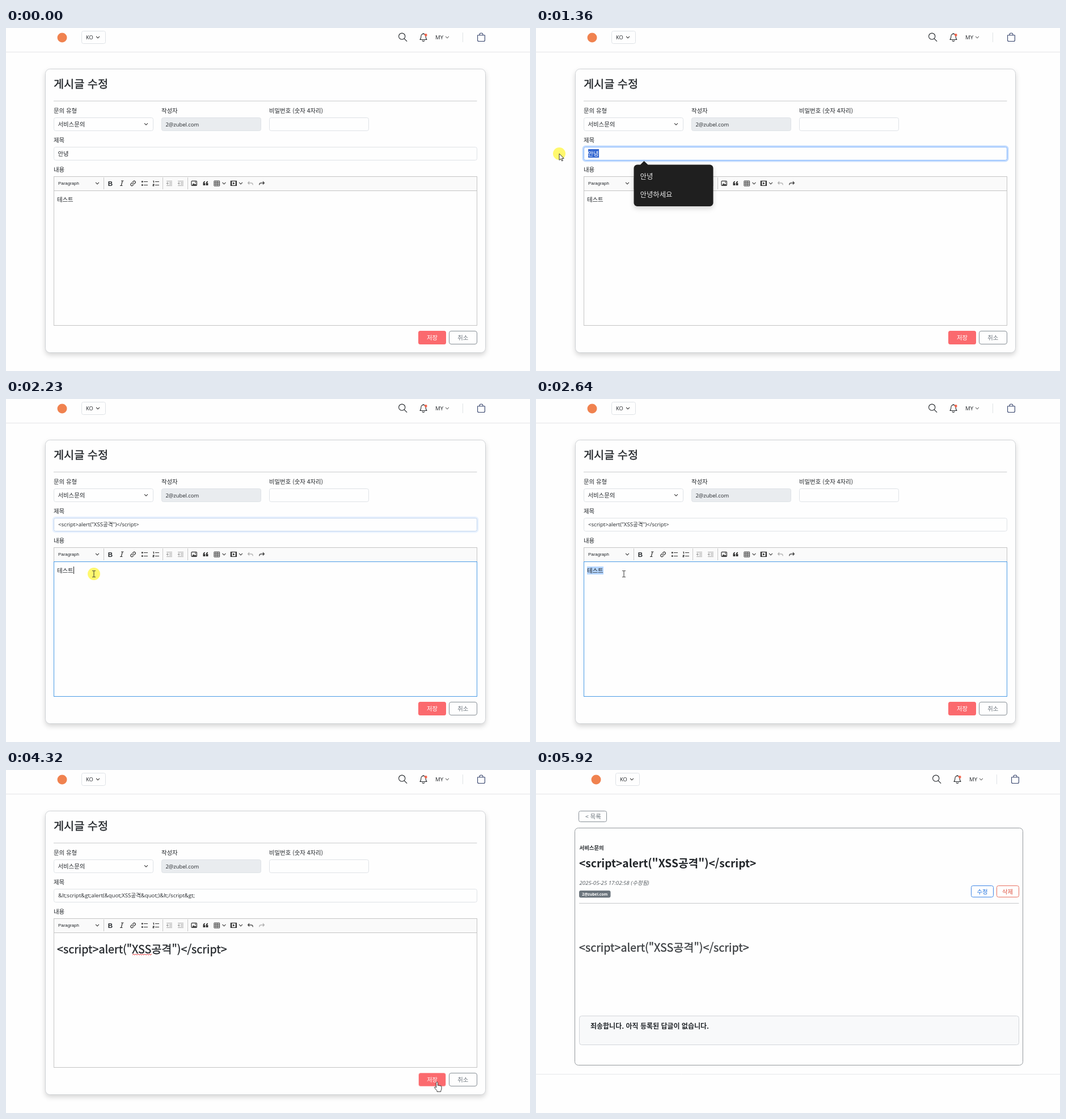
An HTML page for the animation above (6.45 s loop, 924 px wide and 606 px high).

```html
<!DOCTYPE html>
<html lang="ko">
<head>
<meta charset="utf-8">
<title>게시글 수정</title>
<style>
html, body { margin: 0; width: 100%; height: 100%; overflow: hidden; background: #fefefe; }
svg { display: block; width: 924px; height: 606px; }
text { font-family: "Noto Sans CJK KR", "Noto Sans CJK JP", "Noto Sans CJK", sans-serif; font-size: 10.4px; fill: #212529; white-space: pre; }
.ui { font-family: "Open Sans", "Noto Sans CJK KR", "Noto Sans CJK JP", sans-serif; font-size: 9.6px; }
.head { font-size: 19.7px; stroke: #212529; stroke-width: .35px; }
.soft { fill: #3a3d40; stroke: #3a3d40; }
.bold { font-weight: 700; }
.mid { text-anchor: middle; }
.line { fill: none; stroke: #212529; stroke-width: 1.1; stroke-linecap: round; stroke-linejoin: round; }
.box { fill: #fefefe; stroke: #dee2e6; }
.rule { stroke: #c6c8ca; }
.tool { fill: none; stroke: #333; stroke-width: 1.2; }
.dim { opacity: .4; }
.card { filter: drop-shadow(0 4px 4px rgba(0, 0, 0, .16)); }

.step, .ease { animation: 6.45s step-end infinite; }
.ease { animation-timing-function: linear; }

@keyframes edit { 71.3% { opacity: 0 } }
@keyframes view { 0% { opacity: 0 } 71.3% { opacity: 1 } }
@keyframes shift { 71.3% { transform: translateX(7px) } }
@keyframes late { 71.3% { opacity: 0 } 75.1% { opacity: 1 } }
@keyframes footer { 0% { opacity: 0 } 75.1% { opacity: 1 } }

@keyframes ring { 0%, 14.4% { opacity: 0 } 16.7%, 33.4% { opacity: 1 } 35.2%, 100% { opacity: 0 } }
@keyframes popup { 0%, 26.4% { opacity: 0 } 15.5% { opacity: 1 } }
@keyframes picked { 0%, 26.4% { opacity: 0 } 17.6% { opacity: 1 } }
@keyframes oldTitle { 26.4% { opacity: 0 } }
@keyframes newTitle { 0%, 65.7% { opacity: 0 } 26.4% { opacity: 1 } }
@keyframes escaped { 0% { opacity: 0 } 65.7% { opacity: 1 } }

@keyframes focus { 0%, 63% { opacity: 0 } 33.8% { opacity: 1 } }
@keyframes caretA { 0%, 36.5% { opacity: 0 } 33.8% { opacity: 1 } }
@keyframes marked { 0%, 44.1% { opacity: 0 } 36.5% { opacity: 1 } }
@keyframes before { 44.1% { opacity: 0 } }
@keyframes after { 0% { opacity: 0 } 44.1% { opacity: 1 } }
@keyframes caretB { 0%, 52.9%, 63% { opacity: 0 } 44.1%, 61% { opacity: 1 } }
@keyframes squiggle { 0% { opacity: 0 } 63% { opacity: 1 } }
@keyframes undo { 0% { opacity: .4 } 44.1% { opacity: 1 } }
@keyframes redo { 0% { opacity: 1 } 44.1% { opacity: .4 } }
@keyframes press { 63% { transform: scale(.97) } }

@keyframes move {
  0%, 3.1% { transform: translate(840px, 586px) }
  4.6% { transform: translate(759px, 552px) }
  12.5%, 13.4% { transform: translate(188px, 255px) }
  14.4% { transform: translate(175px, 222px) }
  19.5%, 33.2% { transform: translate(41px, 222px) }
  34.5%, 44.1% { transform: translate(155px, 309px) }
  51.7%, 52.8% { transform: translate(293px, 428px) }
  53.9%, 55% { transform: translate(310px, 460px) }
  61.5% { transform: translate(764px, 559px) }
  63%, 71.3% { transform: translate(760px, 552px) }
  74.2%, 76% { transform: translate(812px, 547px) }
  80% { transform: translate(823px, 510px) }
  85.7%, 87.7% { transform: translate(794px, 448px) }
  91.7%, 100% { transform: translate(868px, 604px) }
}
@keyframes arrow {
  0%, 4.2%, 13.6%, 33.9%, 60.5%, 91.7% { opacity: 0 }
  3.1%, 12%, 17.9%, 59.2%, 71.3% { opacity: 1 }
}
@keyframes beam {
  0%, 12%, 17.9%, 59.2% { opacity: 0 }
  5.3%, 13.6%, 33.9% { opacity: 1 }
}
@keyframes hand {
  0%, 5.3%, 71.3% { opacity: 0 }
  4.2%, 60.5% { opacity: 1 }
}
@keyframes click {
  0%, 23.2%, 35.9%, 64.9% { opacity: 0 }
  14.4%, 34.2%, 63% { opacity: 1 }
}
#save { transform-box: fill-box; transform-origin: center; animation-name: press; }
</style>
</head>
<body>
<svg viewBox="0 0 924 606">
  <defs>
    <path id="chev" d="M-2.6-1.3L0 1.3 2.6-1.3" fill="none" stroke="#333" stroke-width="1.1" stroke-linecap="round"/>
    <path id="turn" d="M-1.8-3.2L-4.4-.7-1.8 1.8M-4.2-.7H1.5Q4.2-.7 4.4 2.6" fill="none" stroke="#333" stroke-width="1.2"/>
    <g id="dent">
      <path d="M-5-4H5M0-1.3H5M0 1.3H5M-5 4H5" class="tool"/>
      <path d="M-2.2-2.2L-4.6 0-2.2 2.2M-4.6 0H-1" class="tool"/>
    </g>
  </defs>

  <!-- header -->
  <path d="M0 42.5H924" stroke="#e3e5e7"/>
  <g class="step" style="animation-name:shift">
    <circle cx="99" cy="17" r="8.5" fill="#f0824f"/>
    <rect class="box" x="133.5" y="5.5" width="42" height="22" rx="3"/>
    <text class="ui" x="141" y="20" style="font-size:9.3px">KO</text>
    <use href="#chev" x="162" y="16.5"/>
    <circle class="line" cx="698.2" cy="14.7" r="5.6"/>
    <path class="line" d="M702.3 18.8L706.8 23.3"/>
    <g class="step" style="animation-name:late">
      <path class="line" d="M730 20.5h12c-1.9-1.6-1.7-3.6-1.9-6a4.1 4.1 0 0 0-8.2 0c-.2 2.4 0 4.4-1.9 6zM736 10.2V9.2M734.3 22.3a1.8 1.8 0 0 0 3.4 0"/>
      <use href="#chev" x="778" y="16.5" opacity=".7"/>
    </g>
    <circle cx="740.3" cy="12.4" r="2.3" fill="#f5634a"/>
    <text class="ui" x="757" y="20">MY</text>
    <path d="M805.5 8V25" stroke="#dee2e6"/>
    <path class="line" d="M831.6 12.8h12.8v8.7a2 2 0 0 1-2 2h-8.8a2 2 0 0 1-2-2zM835 12.6v-.8a3 2.8 0 0 1 6 0v.8" style="stroke:#34426b"/>
  </g>

  <!-- edit form -->
  <g class="step" style="animation-name:edit">
    <rect class="box card" x="69.5" y="72.5" width="776" height="501" rx="8" style="stroke:#d0d3d6"/>
    <text class="head" x="84" y="106.3">게시글 수정</text>
    <path class="rule" d="M84 129H830.5"/>

    <text x="84" y="150">문의 유형</text>
    <text x="274" y="150">작성자</text>
    <text x="464" y="150">비밀번호 (숫자 4자리)</text>
    <text x="84" y="202">제목</text>
    <text x="84" y="254">내용</text>

    <rect class="box" x="84.5" y="158.5" width="175" height="23" rx="3"/>
    <text x="91.5" y="173.7">서비스문의</text>
    <use href="#chev" x="247" y="170"/>
    <rect class="box" x="274.5" y="158.5" width="175" height="23" rx="3" style="fill:#e9ecef"/>
    <text class="ui" x="281.5" y="173.5" style="font-size:9.4px">2@zubel.com</text>
    <rect class="box" x="464.5" y="158.5" width="175" height="23" rx="3"/>

    <rect class="box" x="84.5" y="210.5" width="746" height="23" rx="3"/>
    <g class="ease" style="animation-name:ring">
      <rect x="83" y="209" width="749" height="26" rx="4.5" fill="none" stroke="#c2dbfe" stroke-width="3"/>
      <rect x="84.5" y="210.5" width="746" height="23" rx="3" fill="#fefefe" stroke="#86b7fe"/>
    </g>
    <text class="step" x="91.5" y="225.5" style="animation-name:oldTitle">안녕</text>
    <g class="step" style="animation-name:picked">
      <rect x="92" y="214" width="19" height="15" fill="#3367d1"/>
      <text x="91.5" y="225.5" style="fill:#fff">안녕</text>
    </g>
    <text class="ui step" x="92" y="225.3" style="animation-name:newTitle">&lt;script&gt;alert("XSS공격")&lt;/script&gt;</text>
    <text class="ui step" x="92" y="225.3" style="animation-name:escaped">&amp;lt;script&amp;gt;alert(&amp;quot;XSS공격&amp;quot;)&amp;lt;/script&amp;gt;</text>

    <!-- editor -->
    <rect x="84.5" y="262.5" width="746" height="25" fill="#fafafa" stroke="#c4c4c4"/>
    <rect x="84.5" y="287.5" width="746" height="238" fill="#fefefe" stroke="#c4c4c4"/>
    <rect class="step" x="84.5" y="287.5" width="746" height="238" fill="none" stroke="#4a9be6" style="animation-name:focus"/>
    <text x="92" y="276.5" style="font:7.9px 'Liberation Sans',Arial,sans-serif">Paragraph</text>
    <use href="#chev" x="161" y="274.5"/>
    <path d="M172.5 264V285M276.5 264V285M320.5 264V285" stroke="#c9c9c9"/>
    <text class="mid bold" x="184" y="278.5" style="font-family:'Liberation Sans',Arial,sans-serif;font-size:11.5px">B</text>
    <path class="tool" d="M203 270H207.5M201 278.5H205.5M205.4 270L203.2 278.5"/>
    <g class="tool" transform="translate(224 274.5) rotate(-45)">
      <path d="M-.5-2.2H-3a2.2 2.2 0 0 0 0 4.4H-.5M.5-2.2H3a2.2 2.2 0 0 1 0 4.4H.5M-2 0H2"/>
    </g>
    <path class="tool" d="M243 271.5H250M243 277.5H250M263 271.5H270M263 277.5H270"/>
    <path d="M239 270.2h2.6v2.6h-2.6zM239 276.2h2.6v2.6h-2.6z" fill="#333"/>
    <path class="tool" d="M259.3 270.3h1.2v3.2M258.9 276h2v1.4h-1.6v1.6h2"/>
    <use href="#dent" class="dim" x="288" y="274.5"/>
    <use href="#dent" class="dim" x="308" y="274.5"/>
    <rect class="tool" x="327" y="270.3" width="9.4" height="8" rx="1"/>
    <path d="M328 277.8l2.6-3.6 2 2 1.4-1.2 2.2 2.8z" fill="#333"/>
    <circle cx="334" cy="272.6" r="1" fill="#333"/>
    <path d="M347.5 278v-3.4q0-3.4 3.4-4v1.6q-1.4.4-1.4 1.8h1.8v4zM352.6 278v-3.4q0-3.4 3.4-4v1.6q-1.4.4-1.4 1.8h1.8v4z" fill="#333"/>
    <path class="tool" d="M367 270.2H376.6V279H367zM367 273.1H376.6M367 276H376.6M370.2 270V279M373.4 270V279" style="stroke-width:1"/>
    <use href="#chev" x="384.5" y="274.5"/>
    <rect class="tool" x="396.4" y="270.4" width="10" height="8"/>
    <path d="M400 272.2l3.6 2.2-3.6 2.2zM397 270v9h1.3v-9zM404.7 270v9h1.3v-9z" fill="#333"/>
    <use href="#chev" x="414" y="274.5"/>
    <use href="#turn" class="step" x="431" y="274.5" style="animation-name:undo"/>
    <g class="step" style="animation-name:redo"><use href="#turn" transform="translate(451 274.5) scale(-1 1)"/></g>

    <rect class="step" x="90" y="296" width="29" height="14" fill="#b4d5fe" style="animation-name:marked"/>
    <text class="step" x="90" y="306.7" style="animation-name:before">테스트</text>
    <path class="step" d="M119.5 296V309" stroke="#222" style="animation-name:caretA"/>
    <text class="head step" x="90" y="324" style="animation-name:after">&lt;script&gt;alert("XSS공격")&lt;/script&gt;</text>
    <path class="step" d="M91.5 332V345" stroke="#222" style="animation-name:caretB"/>
    <path class="step" d="M223 327l2-2 2 2 2-2 2 2 2-2 2 2 2-2 2 2 2-2 2 2 2-2 2 2 2-2 2 2 2-2 2 2 2-2" fill="none" stroke="#e5383b" style="animation-name:squiggle"/>

    <g id="save" class="step">
      <rect x="727" y="535" width="49" height="24" rx="3.5" fill="#fb6a6e"/>
      <text class="mid" x="751.5" y="551" style="fill:#fff">저장</text>
    </g>
    <rect x="781.5" y="535.5" width="49" height="23" rx="3.5" fill="#fefefe" stroke="#868e95"/>
    <text class="mid" x="805.8" y="551" style="fill:#6c757d">취소</text>

    <!-- suggestions -->
    <g class="step" style="animation-name:popup">
      <path class="card" d="M178.5 241.5H184L190.5 235 197.5 241.5H306.5a6 6 0 0 1 6 6V309a6 6 0 0 1-6 6H178.5a6 6 0 0 1-6-6V247.5a6 6 0 0 1 6-6z" fill="#1f1f1f"/>
      <text x="183.5" y="266.5" style="font-size:12.4px;fill:#e8e8e8">안녕</text>
      <text x="183.5" y="298.7" style="font-size:12.4px;fill:#e8e8e8">안녕하세요</text>
    </g>
  </g>

  <!-- saved post -->
  <g class="step" style="animation-name:view">
    <rect x="75.5" y="72.5" width="49" height="19" rx="3" fill="#fefefe" stroke="#868e95"/>
    <text class="mid" x="100.8" y="85.8" style="fill:#6c757d">&lt; 목록</text>
    <rect x="68.5" y="102.5" width="790" height="419" rx="6" fill="#fefefe" stroke="#94999d"/>
    <text class="bold" x="76.5" y="140.5" style="font-size:9.4px">서비스문의</text>
    <text class="bold" x="76" y="171.5" style="font-size:19.2px">&lt;script&gt;alert("XSS공격")&lt;/script&gt;</text>
    <text class="ui" x="76.5" y="203" style="font-size:9.7px;font-style:italic;fill:#555b60">2025-05-25 17:02:58 (수정됨)</text>
    <rect x="76" y="213" width="55.5" height="12.5" rx="3" fill="#6c757d"/>
    <text class="ui bold mid" x="103.8" y="222" style="font-size:6.9px;fill:#fff">2@zubel.com</text>
    <rect x="767.5" y="204.5" width="39" height="20" rx="3" fill="#fefefe" stroke="#3f86e6"/>
    <text class="mid" x="787" y="218.7" style="fill:#1f72e0">수정</text>
    <rect x="812.5" y="204.5" width="39" height="20" rx="3" fill="#fefefe" stroke="#e8705f"/>
    <text class="mid" x="831.5" y="218.7" style="fill:#e0523f">삭제</text>
    <path class="rule" d="M76 235.5H851.5"/>
    <text class="head soft" x="76" y="320.5">&lt;script&gt;alert("XSS공격")&lt;/script&gt;</text>
    <rect x="76.5" y="434.5" width="775" height="51" rx="4" fill="#f8f9fa" stroke="#d3d6da"/>
    <text class="bold" x="96" y="457" style="font-size:12px">죄송합니다. 아직 등록된 답글이 없습니다.</text>
    <path class="step" d="M0 537.5H924" stroke="#e6e8ea" style="animation-name:footer"/>
  </g>

  <!-- pointer -->
  <g class="ease" style="animation-name:move">
    <circle class="step" r="11" fill="#fff53d" fill-opacity=".75" style="animation-name:click"/>
    <path class="step" d="M0 0V11.5L2.7 9 4.6 13 6.4 12.2 4.6 8.4H8.2z" fill="#fff" stroke="#222" stroke-width=".9" style="animation-name:arrow"/>
    <path class="step" d="M-2.8-5.5H-.6L0-5 .6-5.5H2.8M-2.8 5.5H-.6L0 5 .6 5.5H2.8M0-5V5" fill="none" stroke="#333" style="animation-name:beam"/>
    <path class="step" d="M-1.4 9V.6a1.4 1.4 0 0 1 2.8 0V5.5q1.3-.9 2.4.3 1.3-.8 2.2.4 1.9-.5 2 1.2V11q0 2-1.2 3.4V16.3H0V14.6L-4.4 9.4q-.3-1.6 1.3-1.5z" fill="#fff" stroke="#222" stroke-width=".9" style="animation-name:hand"/>
  </g>
</svg>
</body>
</html>
```
